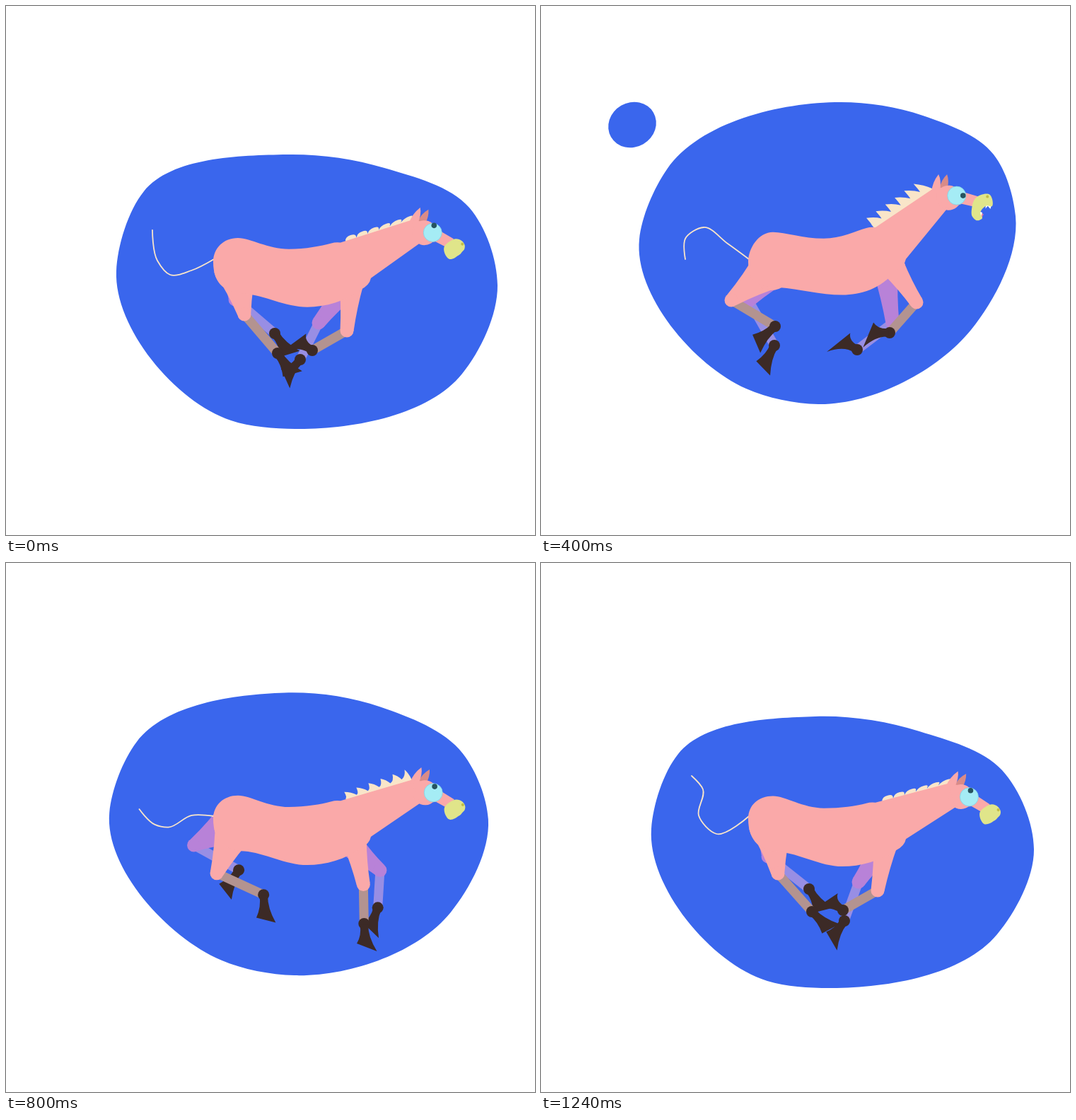
Write an HTML page with a canvas that moves like this. It is 748 by 748 pixels and loops after 1.28 s.

```html
<!DOCTYPE html>
<html lang="en">
<head>
<meta charset="utf-8">
<title>Galloping horse</title>
<style>
  html, body { margin: 0; width: 100%; height: 100%; overflow: hidden; background: #fff; }
  canvas { display: block; width: 748px; height: 748px; }
</style>
</head>
<body>
<canvas id="stage" width="748" height="748"></canvas>
<script>
const ctx = document.getElementById('stage').getContext('2d');
const LOOP = 1280, STEP = 40, TAU = Math.PI * 2, DEG = Math.PI / 180;
const C = {
  blue: '#3a66ed', pink: '#faa9a9', shin: '#b39390', farThigh: '#b882d8', farShin: '#988ee4',
  hoof: '#3c2a26', mane: '#f9e5c9', ear: '#d98b88', eye: '#a5ecf5', pupil: '#27545f',
  nose: '#e0e58a', nostril: '#c2bd45', tongue: '#e27aa8'
};

// Pose times in ms; every table below has one row per time.
const KEYS = [0, 240, 400, 640, 920, 1120, 1240];

const dip = [[.73], [0], [.18], [.56], [.9], [1], [.84]];
const mouth = [[0], [1], [.8], [0], [0], [0], [0]];
const pupil = [[2, -10], [8, 0], [9, 0], [3, -7], [2, -9], [3, -9], [2, -9]];

const blob = [
  [398, 210, 535, 229, 655, 285, 695, 395, 645, 520, 409, 598, 318, 586, 156, 375, 195, 262],
  [445, 155, 560, 172, 655, 220, 683, 317, 628, 474, 395, 574, 300, 554, 149, 355, 192, 247],
  [424, 136, 540, 155, 640, 210, 671, 297, 608, 458, 392, 563, 290, 541, 139, 330, 178, 231],
  [405, 152, 530, 171, 640, 238, 672, 322, 612, 468, 398, 569, 285, 536, 139, 335, 178, 238],
  [385, 207, 530, 228, 650, 291, 690, 392, 640, 515, 414, 594, 318, 582, 152, 367, 190, 265],
  [370, 228, 530, 250, 650, 309, 698, 418, 645, 535, 415, 605, 320, 596, 157, 378, 192, 281],
  [388, 217, 535, 238, 652, 293, 697, 405, 645, 525, 411, 601, 320, 591, 156, 376, 194, 270]
];

// Centre and radius of the drop that is thrown off.
const dropKeys = [80, 240, 400, 480, 560, 640, 720, 800];
const drop = [
  [230, 270, 34], [176, 216, 35], [129, 168, 33], [106, 152, 26.5],
  [85, 150, 20.5], [74, 174, 14.5], [69, 210, 7.5], [68, 255, 0]
];

const tail = [
  [262, 374, 232, 380, 214, 360, 207, 317],
  [268, 333, 238, 322, 212, 341, 201, 380],
  [264, 336, 230, 313, 204, 329, 204, 358],
  [262, 369, 230, 357, 221, 323, 199, 311],
  [262, 343, 228, 370, 201, 392, 186, 377],
  [257, 333, 221, 318, 198, 338, 208, 370],
  [248, 383, 223, 357, 229, 320, 213, 301]
];

// First and last tuft offsets, roundness.
const tufts = [
  [-1, -8, 6, -8, 1], [-19, -16, -18, -17, 0], [-11, -14, -13, -16, 0], [-5, -13, -2, -19, 0],
  [-2, -12, 10, -18, 0], [-2, -9, 14, -14, .1], [0, -8, 8, -8, 1]
];

// Legs: knee, ankle, toe angle.
const nearHind = [
  [337, 436, 384, 491, 36], [301, 433, 353, 484, 93], [269, 416, 331, 453, 119], [280, 429, 346, 458, 88],
  [312, 444, 376, 479, 53], [328, 445, 382, 494, 41], [335, 439, 383, 493, 24]
];
const farHind = [
  [324, 415, 380, 463, 35], [332, 413, 376, 471, 62], [294, 417, 330, 480, 98], [251, 385, 307, 432, 138],
  [285, 413, 351, 443, 72], [310, 418, 374, 454, 50], [321, 415, 379, 461, 38]
];
const nearFront = [
  [482, 459, 433, 487, 178], [526, 417, 486, 457, 160], [531, 419, 493, 462, 151], [532, 433, 518, 487, 91],
  [482, 467, 483, 520, 69], [455, 465, 417, 506, 147], [476, 463, 427, 491, 180]
];
const farFront = [
  [442, 448, 416, 500, 110], [484, 450, 428, 486, 178], [497, 448, 447, 486, 176], [518, 438, 476, 485, 155],
  [525, 437, 544, 493, 49], [478, 457, 481, 514, 68], [449, 451, 429, 506, 104]
];

const noseOpen = [26, 2, 36, -5, 47, -6, 51, 1, 51, 12, 43, 10, 36, 15, 33, 22, 38, 30, 31, 34, 24, 29, 23, 15];
const noseShut = [27, 4, 34, -2, 43, -2, 49, 3, 50, 8, 48, 13, 47, 16, 44, 20, 41, 24, 34, 28, 27, 24, 22, 15];

const mix = (a, b, k) => a + (b - a) * k;
const mixAll = (a, b, k) => a.map((v, i) => mix(v, b[i], k));
const clamp = v => Math.max(0, Math.min(1, v));
const polar = (x, y, a, r) => [x + Math.cos(a * DEG) * r, y + Math.sin(a * DEG) * r];

// Cyclic cubic interpolation through unevenly spaced rows.
function at(rows, t, keys = KEYS) {
  const n = keys.length;
  const key = i => keys[(i + n) % n] + Math.floor(i / n) * LOOP;
  const row = i => rows[(i + n) % n];
  let i = n - 1;
  while (i > 0 && keys[i] > t) i--;
  const h = key(i + 1) - key(i), s = (t - key(i)) / h;
  const slope = (j, c) => {
    const a = key(j) - key(j - 1), b = key(j + 1) - key(j);
    const va = (row(j)[c] - row(j - 1)[c]) / a, vb = (row(j + 1)[c] - row(j)[c]) / b;
    return (va * b + vb * a) / (a + b);
  };
  return row(i).map((p, c) => {
    const q = row(i + 1)[c], s2 = s * s, s3 = s2 * s;
    return p * (2 * s3 - 3 * s2 + 1) + q * (3 * s2 - 2 * s3)
      + h * (slope(i, c) * (s3 - 2 * s2 + s) + slope(i + 1, c) * (s3 - s2));
  });
}

// Smooth curve through points given as x, y, x, y ...
function curve(flat, closed) {
  const n = flat.length / 2;
  const pt = i => {
    const k = closed ? (i + n) % n : Math.max(0, Math.min(n - 1, i));
    return [flat[2 * k], flat[2 * k + 1]];
  };
  const gap = (a, b) => Math.hypot(b[0] - a[0], b[1] - a[1]) || 1e-3;
  const tangent = i => {
    const a = pt(i - 1), b = pt(i), c = pt(i + 1), d = gap(a, b), e = gap(b, c);
    return [0, 1].map(k => ((b[k] - a[k]) / d * e + (c[k] - b[k]) / e * d) / (d + e));
  };
  ctx.beginPath();
  ctx.moveTo(...pt(0));
  for (let i = 0; i < (closed ? n : n - 1); i++) {
    const a = pt(i), b = pt(i + 1), d = gap(a, b) / 3, u = tangent(i), v = tangent(i + 1);
    ctx.bezierCurveTo(a[0] + u[0] * d, a[1] + u[1] * d, b[0] - v[0] * d, b[1] - v[1] * d, ...b);
  }
}

function fill(color) {
  ctx.fillStyle = color;
  ctx.fill();
}

function disc(x, y, r, color) {
  ctx.beginPath();
  ctx.arc(x, y, r, 0, TAU);
  fill(color);
}

function shape(color, ...pts) {
  ctx.beginPath();
  pts.forEach(p => ctx.lineTo(...p));
  fill(color);
}

function drawBlob(t) {
  curve(at(blob, t), true);
  fill(C.blue);
  if (t < 80 || t >= 800) return;
  const [x, y, r] = at(drop, t, dropKeys);
  if (r <= 0) return;
  if (t >= 340) {
    ctx.beginPath();
    ctx.ellipse(x, y, r * 1.05, r * .95, -30 * DEG, 0, TAU);
    fill(C.blue);
    return;
  }
  // The neck travels with the bulge, then pinches off.
  const p = clamp((t - 240) / 100), early = t < 240;
  const dx = early ? x - 176 : 0, dy = early ? y - 216 : 0;
  const spot = (x0, y0, x1, y1) => [mix(x0, x1, p) + dx, mix(y0, y1, p) + dy];
  const a = -36 + 60 * p, b = 138 - 60 * p;
  ctx.beginPath();
  ctx.moveTo(...spot(245, 203, 215, 214));
  ctx.quadraticCurveTo(...spot(222, 214, 188, 226), ...polar(x, y, a, r));
  ctx.arc(x, y, r, a * DEG, b * DEG, true);
  ctx.quadraticCurveTo(...spot(180, 256, 186, 230), ...spot(160, 295, 172, 262));
  ctx.lineTo(...spot(215, 260, 200, 250));
  fill(C.blue);
}

// Tapered limb between two circles with slightly hollow sides.
function thigh(hx, hy, hr, kx, ky, color) {
  const kr = 9.5, a = Math.atan2(ky - hy, kx - hx), nx = -Math.sin(a), ny = Math.cos(a);
  const w = (hr + kr) * .42, mx = (hx + kx) / 2, my = (hy + ky) / 2;
  ctx.beginPath();
  ctx.moveTo(hx + nx * hr, hy + ny * hr);
  ctx.quadraticCurveTo(mx + nx * w, my + ny * w, kx + nx * kr, ky + ny * kr);
  ctx.lineTo(kx - nx * kr, ky - ny * kr);
  ctx.quadraticCurveTo(mx - nx * w, my - ny * w, hx - nx * hr, hy - ny * hr);
  fill(color);
  disc(hx, hy, hr, color);
  disc(kx, ky, kr, color);
}

function hoof(x, y, toe, front) {
  const fold = front ? Math.max(0, toe - 110) : 0;
  const heel = toe + (front ? 45 : 41) + fold * .4;
  const tip = polar(x, y, toe, 43), back = polar(x, y, heel, front ? 30 - fold * .07 : 34);
  const axis = (toe + heel) / 2;
  disc(x, y, 8, C.hoof);
  ctx.beginPath();
  ctx.moveTo(...polar(x, y, axis - 75, 6));
  ctx.quadraticCurveTo(...polar(x, y, axis - 14, 19), ...tip);
  ctx.lineTo(...back);
  ctx.quadraticCurveTo(...polar(x, y, axis + 14, 17), ...polar(x, y, axis + 75, 6));
  fill(C.hoof);
}

function leg([kx, ky, ax, ay, toe], hx, hy, hr, near, front) {
  ctx.lineWidth = 13;
  ctx.strokeStyle = near ? C.shin : C.farShin;
  ctx.beginPath();
  ctx.moveTo(kx, ky);
  ctx.lineTo(ax, ay);
  ctx.stroke();
  thigh(hx, hy, hr, kx, ky, near ? C.pink : C.farThigh);
  hoof(ax, ay, toe, front);
}

function drawMane(t, x0, y0, x1, y1) {
  const [ax, ay, bx, by, round] = at(tufts, t), n = 6;
  const base = i => [mix(x0, x1, i / n), mix(y0, y1, i / n)];
  const off = i => [mix(ax, bx, i / 5), mix(ay, by, i / 5)];
  const lift = (i, o, k) => base(i).map((v, c) => v + o[c] * k);
  ctx.beginPath();
  ctx.moveTo(x0 + 4, y0 + 4);
  ctx.lineTo(x0, y0);
  for (let i = 0; i < n; i++) {
    const o = off(i), a = lift(i, o, .3), b = lift(i + 1, o, i === n - 1 ? 0 : .3);
    const tip = mixAll(lift(i, o, 1), lift(i + .5, o, 1), round);
    const low = mixAll(mixAll(a, tip, .5).map((v, c) => v + [3, 3][c]), lift(i, o, 1), round);
    const top = mixAll(mixAll(tip, b, .5).map((v, c) => v + [1, -2][c]), lift(i + 1, o, 1), round);
    ctx.lineTo(...a);
    ctx.quadraticCurveTo(...low, ...tip);
    ctx.quadraticCurveTo(...top, ...b);
  }
  ctx.lineTo(x1 + 4, y1 + 5);
  fill(C.mane);
}

function drawBody(u, neckTop, neckLow) {
  const rump = 317 + 15 * u, back = 324 + 27 * u, withers = 307 + 39 * u;
  const chest = 350 + 49 * u, belly = 403 + 31 * u, flank = 395 + 16 * u;
  ctx.beginPath();
  ctx.moveTo(293, 362);
  ctx.bezierCurveTo(293, 342, 308, rump, 328, rump);
  ctx.bezierCurveTo(346, rump, 370, back, 400, back);
  ctx.bezierCurveTo(424, back, 445, withers + 4, 460, withers);
  ctx.quadraticCurveTo(466, withers - 2, 473, withers - 1);
  ctx.lineTo(...neckTop);
  ctx.lineTo(...neckLow);
  ctx.lineTo(516, chest - 1);
  ctx.quadraticCurveTo(514, chest + 9, 502, chest + 15);
  ctx.bezierCurveTo(480, belly - 8, 452, belly, 426, belly);
  ctx.bezierCurveTo(395, belly, 365, flank + 2, 337, flank);
  ctx.bezierCurveTo(312, flank, 293, 394, 293, 362);
  fill(C.pink);
}

function drawHead(t, ex, ey, turn) {
  const m = clamp(at(mouth, t)[0]), [px, py] = at(pupil, t);
  ctx.save();
  ctx.translate(ex, ey);
  ctx.rotate(turn);
  ctx.beginPath();
  ctx.moveTo(-25, -8);
  ctx.quadraticCurveTo(-24, -20, -16, -29);
  ctx.quadraticCurveTo(-12, -20, -14, -8);
  fill(C.ear);
  ctx.beginPath();
  ctx.moveTo(-36, -2);
  ctx.quadraticCurveTo(-36, -16, -28, -28);
  ctx.quadraticCurveTo(-23, -20, -24, -4);
  fill(C.pink);
  disc(-11, 4, 17.5, C.pink);
  shape(C.pink, [-34, -7], [-10, -12], [12, -5], [31, -1], [28, 14], [8, 11], [-13, 21]);
  if (m > .3) {
    shape('#fff', [42, 9], [50, 10], [49, 15], [45, 11], [42, 15]);
    shape(C.tongue, [32, 20], [40, 23], [38, 28], [32, 27]);
    shape('#fff', [31, 19], [38, 21], [37, 26], [31, 25]);
  }
  curve(mixAll(noseShut, noseOpen, m), true);
  fill(C.nose);
  disc(mix(45, 43, m), mix(2, -3, m), 2, C.nostril);
  ctx.restore();
  disc(ex, ey, 13, C.eye);
  ctx.lineWidth = .8;
  ctx.strokeStyle = '#7fd3e6';
  ctx.stroke();
  disc(ex + px, ey + py, 3.8, C.pupil);
}

function draw(t) {
  ctx.fillStyle = '#fff';
  ctx.fillRect(0, 0, 748, 748);
  drawBlob(t);

  const u = at(dip, t)[0], turn = 25.5 * DEG * u;
  const ex = 581 + 40 * u - 13 * u * u, ey = 251 + 95 * u;
  const onHead = (x, y) => [
    ex + x * Math.cos(turn) - y * Math.sin(turn),
    ey + x * Math.sin(turn) + y * Math.cos(turn)
  ];

  const fh = at(farHind, t), ff = at(farFront, t), nh = at(nearHind, t), nf = at(nearFront, t);
  const shoulder = 362 + 42 * u, shift = 6 * clamp((t - 420) / 200) * clamp((1250 - t) / 100);
  leg(fh, 331 - shift, 365, 33, false, false);
  leg(ff, 486 + (ff[0] - 486) * .15, shoulder + 8, 17, false, true);

  curve([294, 358, ...at(tail, t)], false);
  ctx.lineWidth = 1.8;
  ctx.lineCap = 'round';
  ctx.strokeStyle = C.mane;
  ctx.stroke();
  ctx.lineCap = 'butt';

  drawMane(t, 468 + 17 * u, 307 + 38 * u, ...onHead(-35, -7));
  leg(nh, 325, 371, 31, true, false);
  leg(nf, 490 + (nf[0] - 490) * .2, shoulder, 17, true, true);
  drawBody(u, onHead(-33, -8), onHead(-13, 21));
  drawHead(t, ex, ey, turn);
}

function tick() {
  draw(Math.floor((performance.now() + 4) / STEP) * STEP % LOOP);
  requestAnimationFrame(tick);
}
tick();
</script>
</body>
</html>
```
